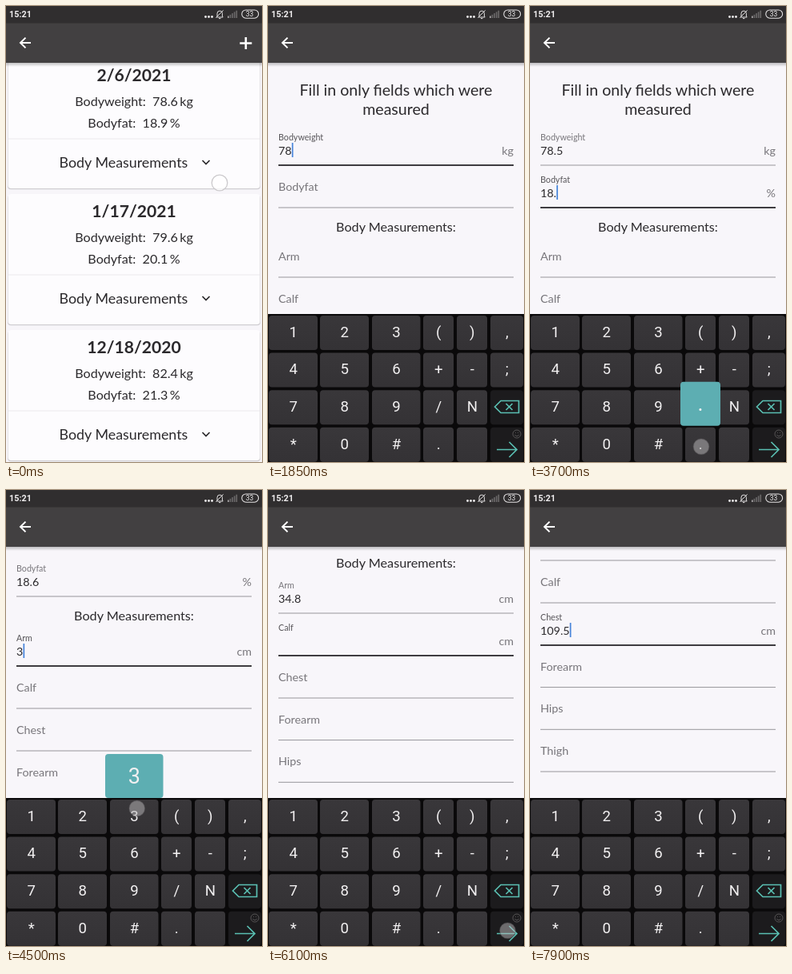
These frames come from a looping animation (320 px wide and 570 px high, 8 s). An HTML page:

```html
<!DOCTYPE html>
<html lang="en">
<head>
<meta charset="utf-8">
<title>Body measurements</title>
<style>
  html, body { margin: 0; width: 100%; height: 100%; overflow: hidden; background: #f8f6fa; }
  svg { display: block; width: 100vw; height: 100vh; }
  text { font-family: Lato, sans-serif; fill: #2b292c; white-space: pre; }
  .mid { text-anchor: middle; }
  .end { text-anchor: end; }
  .key { font-family: Roboto, sans-serif; text-anchor: middle; fill: #f2f0f1; }
  .line { fill: none; stroke: #fff; stroke-width: 2; }
  .teal { fill: none; stroke: #5abfb2; stroke-width: 1.7; }
</style>
</head>
<body>
<svg id="stage" viewBox="0 0 320 570">
  <defs>
    <linearGradient id="shade" x2="0" y2="1">
      <stop stop-color="#000" stop-opacity=".24"/>
      <stop offset="1" stop-color="#000" stop-opacity="0"/>
    </linearGradient>
    <linearGradient id="keyFill" x2="0" y2="1">
      <stop stop-color="#39373a"/>
      <stop offset="1" stop-color="#343235"/>
    </linearGradient>
    <clipPath id="view"><rect id="viewBox" y="85" width="320"/></clipPath>
  </defs>
</svg>
<script>
const LOOP = 8000, BLINK = 200, MOVE = 100;
const VIEW_HEIGHT = 471.5, BOARD_HEIGHT = 185;
const stage = document.getElementById('stage');
const viewBox = document.getElementById('viewBox');

function add(parent, tag, attrs = {}, text) {
  const el = document.createElementNS('http://www.w3.org/2000/svg', tag);
  for (const name in attrs) el.setAttribute(name, attrs[name]);
  if (text !== undefined) el.textContent = text;
  parent.appendChild(el);
  return el;
}
const set = (el, attrs) => { for (const name in attrs) el.setAttribute(name, attrs[name]); };
const show = (el, on) => el.setAttribute('visibility', on ? 'visible' : 'hidden');
const clamp = v => Math.max(0, Math.min(1, v));
const easeOut = v => 1 - (1 - clamp(v)) ** 3;
const progress = (t, start, length) => easeOut((t - start) / length);
const label = (parent, x, y, size, text, cls = '', extra = {}) =>
  add(parent, 'text', { x, y, 'font-size': size, class: cls, ...extra }, text);

function addHeader(parent) {
  add(parent, 'rect', { y: 71, width: 320, height: 5, fill: 'url(#shade)' });
  add(parent, 'rect', { y: 21, width: 320, height: 50, fill: '#424041' });
  add(parent, 'path', { d: 'M31 46H18.5M24.5 39.6L18 46L24.5 52.4', class: 'line' });
}

// History list
const list = add(stage, 'g');
add(list, 'rect', { width: 320, height: 570, fill: '#f7f5f9' });
const entries = [
  ['2/6/2021', '78.6', '18.9'],
  ['1/17/2021', '79.6', '20.1'],
  ['12/18/2020', '82.4', '21.3']
];
function addReading(card, y, name, value, unit) {
  const line = label(card, 160, y, 16.1, `${name}:  ${value} `, 'mid');
  add(line, 'tspan', { dx: -1.8 }, unit);
}
entries.forEach(([date, weight, fat], i) => {
  const card = add(list, 'g', { transform: `translate(0 ${65 + 170 * i})` });
  add(card, 'rect', { x: 2, y: 1.3, width: 316, height: 163, rx: 4, fill: '#cfcdd1' });
  add(card, 'rect', { x: 2.5, width: 315, height: 163, rx: 4, fill: '#fdfcfe' });
  label(card, 160, 28.5, 21.1, date, 'mid', { 'font-weight': 700 });
  addReading(card, 59.6, 'Bodyweight', weight, 'kg');
  addReading(card, 86.6, 'Bodyfat', fat, '%');
  add(card, 'path', { d: 'M3 101H317', stroke: '#ebe9ed' });
  label(card, 66.6, 136.5, 17.85, 'Body Measurements');
  add(card, 'path', { d: 'M245.5 128L250 132.5L254.5 128', fill: 'none', stroke: '#2b292c', 'stroke-width': 1.7 });
});
addHeader(list);
add(list, 'path', { d: 'M299.8 39V54M292.3 46.5H307.3', class: 'line', style: 'stroke-width:2.6' });

// Form
const form = add(stage, 'g');
add(form, 'rect', { y: 21, width: 320, height: 549, fill: '#f8f6fa' });
const scroller = add(add(form, 'g', { 'clip-path': 'url(#view)' }), 'g');
label(scroller, 160, 112, 19.6, 'Fill in only fields which were', 'mid');
label(scroller, 160, 135.5, 19.6, 'measured', 'mid');
label(scroller, 160, 282, 16.2, 'Body Measurements:', 'mid');
const fields = [
  ['Bodyweight', 199, 'kg'], ['Bodyfat', 252, '%'], ['Arm', 339, 'cm'], ['Calf', 392, 'cm'],
  ['Chest', 445, 'cm'], ['Forearm', 497.6, 'cm'], ['Hips', 550.3, 'cm'], ['Thigh', 603, 'cm']
].map(([name, y, unit]) => ({
  y,
  line: add(scroller, 'path', { d: `M13 ${y}H307` }),
  name: label(scroller, 13, y - 21, 14.3, name),
  value: label(scroller, 13, y - 13.4, 14.3, ''),
  unit: label(scroller, 307, y - 13.4, 14.3, unit, 'end', { style: 'fill:#77757a' })
}));
const caret = add(scroller, 'rect', { width: 1.7, height: 18, fill: '#4583da' });
addHeader(form);

// Keyboard
const COLS = [[1, 61], [65, 61], [130, 60.5], [194, 38], [236, 38], [278, 41]];
const ROWS = ['123(),', '456+-;', '789/N<', '*0#. >'];
const board = add(stage, 'g');
add(board, 'rect', { y: 385, width: 320, height: 190, fill: '#0a090a' });
const keys = {};
ROWS.forEach((row, r) => [...row].forEach((ch, c) => {
  const [x, w] = COLS[c], y = 387 + 46.6 * r;
  const special = ch === '<' || ch === '>';
  add(board, 'rect', { x, y, width: w, height: 43, rx: 4, fill: special ? '#1c1b1d' : 'url(#keyFill)' });
  if (!special) label(board, x + w / 2 + .3, y + 26.7, 18.6, ch, 'key');
  keys[ch] = { x, y, w };
}));
add(board, 'path', { d: 'M283.5 501L291 493.5H313.5V508.5H291ZM297.5 497L305.5 505M305.5 497L297.5 505', class: 'teal' });
add(board, 'path', { d: 'M286 554.5H311M301.5 545L311 554.5L301.5 564', class: 'teal' });
add(board, 'path', {
  d: 'M306 535a5 5 0 1 0 10 0a5 5 0 1 0 -10 0M308.3 536.3q2.7 3 5.4 0M309 533.4h1M312 533.4h1',
  fill: 'none', stroke: '#5c5a5b', 'stroke-width': .9
});

const popup = add(stage, 'g');
const bubble = add(popup, 'rect', { height: 55, rx: 4, fill: '#5daeb2' });
const bubbleText = label(popup, 0, 0, 27, '', 'key');

// Status bar
add(stage, 'rect', { width: 320, height: 21.5, fill: '#302e2f' });
label(stage, 4, 14.4, 10.8, '15:21', '', { style: 'font-family:Roboto,sans-serif;font-weight:700;fill:#f0eeef' });
for (const x of [249.5, 253.5, 257.5]) add(stage, 'circle', { cx: x, cy: 13.5, r: 1.4, fill: '#f0eeef' });
add(stage, 'path', {
  d: 'M264 13V9.3a3.2 3.2 0 0 1 6.4 0V13l.8 1h-8ZM266 15.6h2.4M271.6 5.4l-9.2 9.2',
  fill: 'none', stroke: '#e4e2e3', 'stroke-width': 1
});
for (let i = 0; i < 5; i++)
  add(stage, 'rect', { x: 277 + 2.6 * i, y: 12.5 - 1.7 * i, width: 1.7, height: 2.5 + 1.7 * i, fill: i ? '#696768' : '#a5a3a4' });
add(stage, 'rect', { x: 294.8, y: 5, width: 20.8, height: 10.2, rx: 5, fill: 'none', stroke: '#e4e2e3', 'stroke-width': 1.1 });
label(stage, 304.4, 13.2, 8.4, '33', 'key');

const touch = add(stage, 'circle', { r: 9.8, 'stroke-width': 1.3 });

// Presses: key, start, end
const presses = [
  ['7', 1080, 1190], ['8', 1430, 1495], ['.', 1890, 2040], ['5', 2480, 2590], ['>', 2800, 2900],
  ['1', 3290, 3390], ['8', 3470, 3570], ['.', 3650, 3750], ['6', 3820, 3930], ['>', 3990, 4090],
  ['3', 4490, 4620], ['4', 4780, 4890], ['.', 5095, 5210], ['8', 5585, 5645],
  ['>', 5790, 5880], ['>', 6050, 6140],
  ['1', 6490, 6570], ['0', 6590, 6690], ['9', 6850, 6960], ['.', 7195, 7290]
];
// Focus changes: time, field, scroll
const focuses = [[680, 0, 0], [2890, 1, 0], [4070, 2, 119], [5865, 3, 185], [6120, 4, 251]];
// Touches without a key popup: x, y, start, end
const taps = [[267, 221, 0, 50], [299, 46, 90, 190], [150, 180, 645, 720], [104, 461, 7790, 7890]];
const LAST_DIGIT = 7840;

const typed = presses.filter(p => p[0] !== '>').map(([ch, at]) => ({
  ch, at, field: focuses.filter(f => f[0] <= at).pop()[1]
}));
typed.push({ ch: '5', at: LAST_DIGIT, field: 4 });

const active = (t, start, end) => t >= start && t < end;

function drawForm(t) {
  const current = focuses.filter(f => f[0] <= t);
  const [focusAt, focused] = current.length ? current[current.length - 1] : [0, -1];
  let scroll = 0;
  for (const [at, , goal] of current) scroll += (goal - scroll) * progress(t, at, MOVE);
  set(scroller, { transform: `translate(0 ${-scroll})` });

  fields.forEach((f, i) => {
    const text = typed.filter(k => k.field === i && k.at <= t).map(k => k.ch).join('');
    const on = i === focused;
    const entry = focuses.find(c => c[1] === i);
    let lift = entry && t >= entry[0] ? progress(t, entry[0], MOVE) : 0;
    if (lift && !on && !text) lift = 1 - progress(t, focusAt, MOVE);
    f.value.textContent = text;
    set(f.name, { y: f.y - 21 - 10 * lift, 'font-size': 14.3 - 3.6 * lift, style: `fill:${on ? '#565458' : '#77757a'}` });
    set(f.line, { stroke: on ? '#3e3c40' : '#97959a', 'stroke-width': on ? 1.9 : 1 });
    show(f.unit, on || text);
  });

  if (focused >= 0) {
    const f = fields[focused];
    const lastAt = Math.max(focusAt, ...typed.filter(k => k.at <= t).map(k => k.at));
    set(caret, { x: 13.2 + f.value.getComputedTextLength(), y: f.y - 28 });
    show(caret, Math.floor((t - lastAt) / BLINK) % 2 === 0);
  } else show(caret, false);
}

function drawTouch(t, press) {
  let tap = taps.find(p => active(t, p[2], p[3]));
  if (press) {
    const k = keys[press[0]];
    const x = k.x + k.w / 2 + ('.>'.includes(press[0]) ? 1 : press[0] === '3' ? 3.5 : 8.5);
    tap = [x, k.y + (k.y > 520 ? 24 : k.y < 400 ? 11 : 18)];
  }
  show(touch, !!tap);
  if (!tap) return;
  const dark = tap[1] > 385 || tap[1] < 71;
  set(touch, {
    cx: tap[0], cy: tap[1],
    fill: dark ? 'rgba(190,188,190,.5)' : 'rgba(255,255,255,.75)',
    stroke: dark ? 'rgba(90,88,90,.4)' : '#cccacd'
  });
}

function drawPopup(press) {
  const on = press && press[0] !== '>';
  show(popup, on);
  if (!on) return;
  const k = keys[press[0]];
  set(bubble, { x: k.x - 6, y: k.y - 57, width: k.w + 12 });
  set(bubbleText, { x: k.x + k.w / 2, y: k.y - 20.5 });
  bubbleText.textContent = press[0];
}

function draw(t) {
  const open = progress(t, 150, 200);
  set(form, { opacity: open, transform: `translate(0 ${140 * (1 - open)})` });
  show(list, open < 1);
  drawForm(t);

  const rise = progress(t, 720, 150);
  set(board, { transform: `translate(0 ${BOARD_HEIGHT * (1 - rise)})` });
  set(viewBox, { height: VIEW_HEIGHT - BOARD_HEIGHT * rise });
  const press = presses.find(p => active(t, p[1], p[2]));
  drawPopup(press);
  drawTouch(t, press);
}

function tick(now) {
  draw(now % LOOP);
  requestAnimationFrame(tick);
}
draw(0);
requestAnimationFrame(tick);
</script>
</body>
</html>
```
